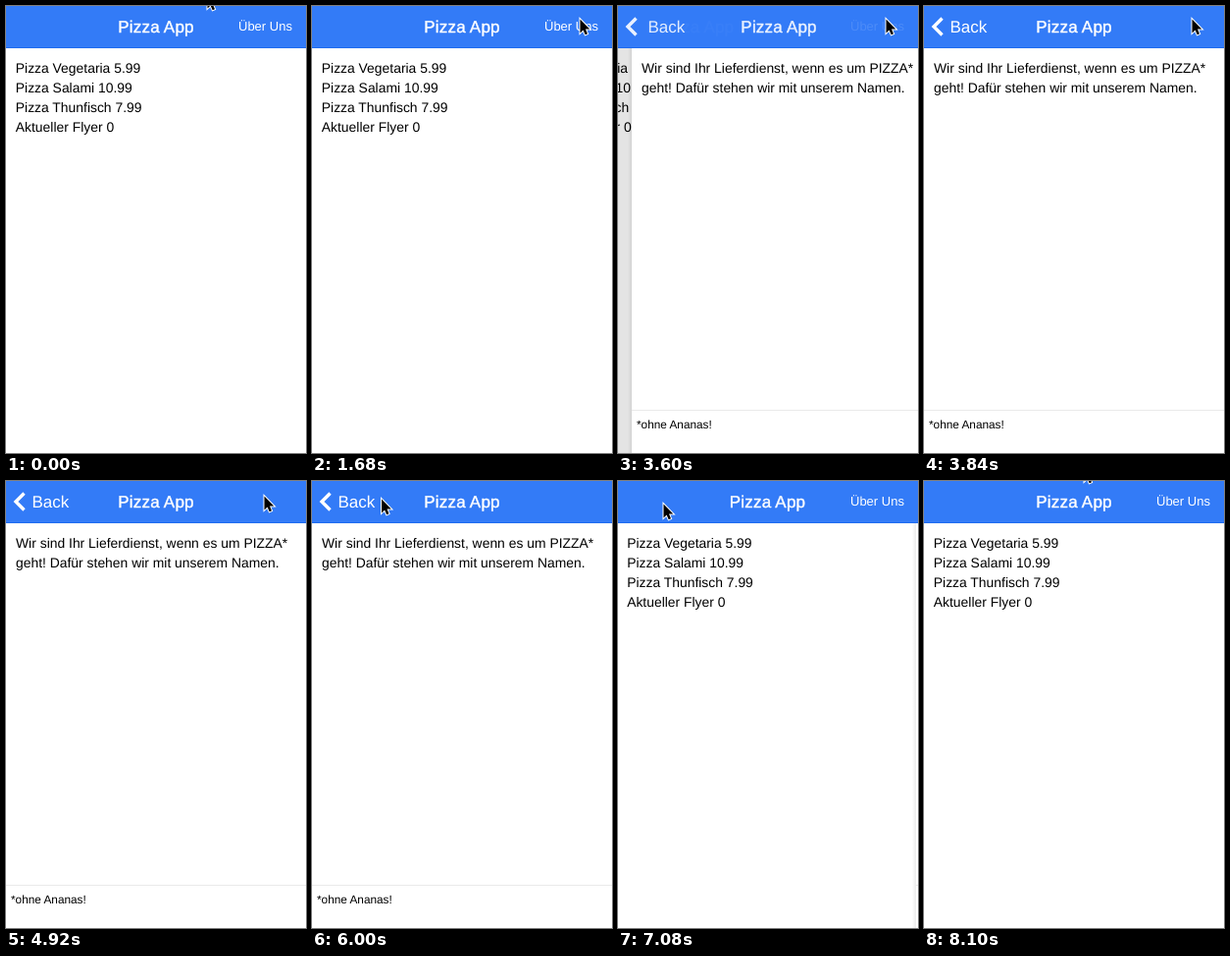
These frames come from a looping animation (306 px wide and 455 px high, 8.52 s). An HTML page:

```html
<!DOCTYPE html>
<html lang="de">
<head>
<meta charset="utf-8">
<title>Pizza App</title>
<style>
  html, body { margin: 0; width: 100%; height: 100%; overflow: hidden; background: #fff; }
  svg { display: block; width: 100%; height: 100%; }
  text { font: 13.9px "Liberation Sans", Arial, sans-serif; text-rendering: geometricPrecision; }
  .bar text { fill: #fff; }
  .bar .title { font-size: 17px; letter-spacing: .2px; text-anchor: middle; stroke: #fff; stroke-width: .4px; }
  .bar .back { font-size: 17px; }
  .bar .button { font-size: 13px; }
  .footer { font-size: 11.8px; }
</style>
</head>
<body>
<svg viewBox="0 0 306 455">
  <defs>
    <linearGradient id="edge"><stop stop-opacity="0"/><stop offset="1" stop-opacity=".08"/></linearGradient>
  </defs>

  <g id="home">
    <text x="9.800" y="68">Pizza Vegetaria 5.99</text>
    <text x="9.800" y="88">Pizza Salami 10.99</text>
    <text x="9.800" y="108">Pizza Thunfisch 7.99</text>
    <text x="9.800" y="128">Aktueller Flyer 0</text>
  </g>
  <rect id="shade" width="306" height="455"/>

  <g id="about">
    <rect x="-4" width="4" height="455" fill="url(#edge)"/>
    <rect width="306" height="455" fill="#fff"/>
    <text x="10" y="68">Wir sind Ihr Lieferdienst, wenn es um PIZZA*</text>
    <text x="10" y="88">geht! Dafür stehen wir mit unserem Namen.</text>
    <rect y="411" width="306" height="1" fill="#eaeaea"/>
    <text class="footer" x="5" y="430">*ohne Ananas!</text>
  </g>

  <g class="bar">
    <rect width="306" height="43" fill="#337bf7"/>
    <rect y="42" width="306" height="1" fill="#1f6cf0"/>
    <rect id="pressed" x="228" y="4" width="73" height="34" rx="3" fill="#0460f2"/>
    <text id="aboutButton" class="button" x="237" y="25">Über Uns</text>
    <text id="homeTitle" class="title" x="153" y="27">Pizza App</text>
    <text id="aboutTitle" class="title" x="153" y="27">Pizza App</text>
    <path id="chevron" d="M18.500 12.500L10 21l8.500 8.500" fill="none" stroke="#fff" stroke-width="3.400"/>
    <text id="backText" class="back" x="26.500" y="27">Back</text>
  </g>

  <path id="cursor" d="M1.500 1.500V15.500L4.600 12.500 6.700 17.300 9 16.300 7 11.600H11.300Z"
        stroke="#fff" stroke-width="2" paint-order="stroke"/>
</svg>

<script>
const LOOP = 8520, STEP = 60, WIDTH = 306;
const PRESS = 3240, OPEN = 3329, BACK_PRESS = 6600, CLOSE = 6683, SLIDE = 500;

// time, x, y
const cursorPath = [
  [540, 204, -13], [900, 204, 51], [1320, 204, 51], [1680, 272, 12],
  [4260, 272, 12], [4440, 268, 14], [4860, 268, 14], [4920, 262, 14],
  [5040, 190, 25], [5220, 94, 12], [5580, 94, 12], [6420, 45, 22],
  [7080, 45, 22], [7440, 159, -1], [7500, 160, -3],
  [7860, 160, -3], [8100, 162, -15]
];

const el = id => document.getElementById(id);
const clamp = v => Math.min(1, Math.max(0, v));
const move = (id, x, y = 0) => el(id).setAttribute('transform', `translate(${x} ${y})`);
const fade = (id, opacity) => el(id).setAttribute('opacity', opacity);

// cubic-bezier(.36, .66, .04, 1)
function ease(progress) {
  const x = clamp(progress);
  if (x === 0 || x === 1) return x;
  const curve = (s, a, b) => 3 * (1 - s) ** 2 * s * a + 3 * (1 - s) * s * s * b + s ** 3;
  let low = 0, high = 1;
  for (let i = 0; i < 24; i++) {
    const mid = (low + high) / 2;
    if (curve(mid, .36, .04) < x) low = mid; else high = mid;
  }
  return curve(low, .66, 1);
}

function cursorAt(t) {
  const next = cursorPath.findIndex(point => point[0] > t);
  if (next === 0) return cursorPath[0].slice(1);
  if (next < 0) return cursorPath[cursorPath.length - 1].slice(1);
  const [t0, x0, y0] = cursorPath[next - 1], [t1, x1, y1] = cursorPath[next];
  const k = (t - t0) / (t1 - t0);
  return [x0 + (x1 - x0) * k, y0 + (y1 - y0) * k];
}

function draw(t) {
  // 0 = home page, 1 = about page
  const page = t < 6000 ? ease((t - OPEN) / SLIDE) : 1 - ease((t - CLOSE) / SLIDE);
  const backLimit = t >= BACK_PRESS ? .3 : 1;

  move('home', -101 * page);
  fade('shade', .11 * page);
  move('about', Math.floor(WIDTH * (1 - page)));
  fade('about', page > 0 ? 1 : 0);

  fade('pressed', t >= PRESS && t < OPEN ? 1 : 0);
  fade('aboutButton', (1 - page) ** .7);
  move('homeTitle', -77 * page);
  fade('homeTitle', (1 - page) ** 1.2);
  move('aboutTitle', 240 * (1 - page));
  fade('aboutTitle', page ** 2);
  fade('chevron', Math.min(backLimit, page ** 2.3));
  move('backText', 87 * (1 - page));
  fade('backText', Math.min(backLimit, page ** 3));

  move('cursor', ...cursorAt(t));
}

const start = performance.now();
function tick() {
  const t = (performance.now() - start) % LOOP;
  draw(Math.floor(t / STEP) * STEP);
  requestAnimationFrame(tick);
}
tick();
</script>
</body>
</html>
```
